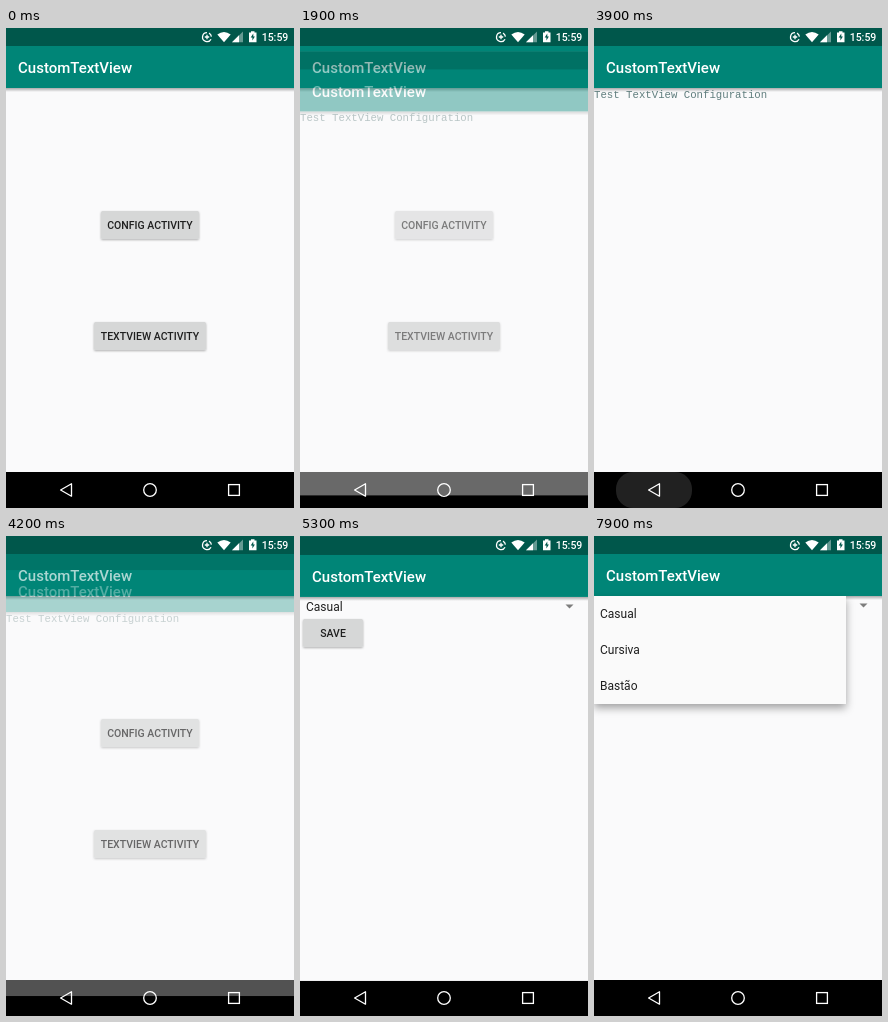
Animation of 288x480 px, one loop 8 s. Source, as an HTML page:

```html
<!DOCTYPE html>
<html lang="en">
<head>
<meta charset="utf-8">
<style>
  html, body { margin: 0; width: 100%; height: 100%; overflow: hidden; background: #000; }
  svg { display: block; width: 288px; height: 480px; }
  text { font-family: Roboto, sans-serif; white-space: pre; }
  .title { font-size: 15px; font-weight: 500; fill: #fff; }
  .label { font-size: 10.5px; font-weight: 500; fill: #1f1f1f; text-anchor: middle; }
  .item { font-size: 12px; fill: #1f1f1f; }
  .mono { font: 10.7px "Liberation Mono", monospace; fill: #5f7d7d; }
  .key { fill: #d6d7d7; filter: url(#lift); }
  .line { fill: none; stroke: #fff; stroke-width: 1.3; }
</style>
</head>
<body>
<svg viewBox="0 0 288 480">
  <defs>
    <linearGradient id="fade" x2="0" y2="1">
      <stop stop-opacity=".32"/><stop offset="1" stop-opacity="0"/>
    </linearGradient>
    <filter id="lift" x="-10%" y="-30%" width="120%" height="170%">
      <feDropShadow dx="0" dy="1" stdDeviation=".8" flood-opacity=".3"/>
    </filter>
    <filter id="float" x="-10%" y="-20%" width="120%" height="150%">
      <feDropShadow dx="0" dy="4" stdDeviation="4" flood-opacity=".36"/>
    </filter>
    <clipPath id="reveal"><rect id="revealBox" y="60" width="252" height="108"/></clipPath>
    <clipPath id="configClip"><rect x="95" y="183" width="98" height="28" rx="1.5"/></clipPath>
    <clipPath id="textClip"><rect x="88" y="294" width="112" height="28" rx="1.5"/></clipPath>
    <g id="frame">
      <rect width="288" height="480" fill="#fafafb"/>
      <rect y="60" width="288" height="4" fill="url(#fade)"/>
      <rect width="288" height="60" fill="#008577"/>
      <rect width="288" height="18" fill="#00574b"/>
      <rect y="444" width="288" height="60"/>
      <text class="title" x="12" y="45.2">CustomTextView</text>
    </g>
  </defs>

  <g id="home">
    <use href="#frame"/>
    <rect class="key" x="95" y="183" width="98" height="28" rx="1.5"/>
    <g clip-path="url(#configClip)"><circle id="configRipple" cx="144" cy="197"/></g>
    <text class="label" x="144" y="200.8">CONFIG ACTIVITY</text>
    <rect class="key" x="88" y="294" width="112" height="28" rx="1.5"/>
    <g clip-path="url(#textClip)"><circle id="textRipple" cx="144" cy="308"/></g>
    <text class="label" x="144" y="311.8">TEXTVIEW ACTIVITY</text>
  </g>

  <g id="textPage">
    <use href="#frame"/>
    <text class="mono" x="0" y="69.5">Test TextView Configuration</text>
  </g>

  <g id="configPage">
    <use href="#frame"/>
    <text class="item" x="6" y="74">Casual</text>
    <path d="M265.5 67.5h8l-4 4z" fill="#7d7d7d"/>
    <rect class="key" x="3" y="82" width="60" height="28" rx="1.5"/>
    <text class="label" x="33" y="100.3">SAVE</text>
  </g>

  <g id="menu">
    <rect id="sheet" y="60" width="252" height="108" fill="#fafafa" filter="url(#float)"/>
    <g clip-path="url(#reveal)">
      <text class="item" x="6" y="82.3">Casual</text>
      <text class="item" x="6" y="118.3">Cursiva</text>
      <text class="item" x="6" y="154.3">Bastão</text>
    </g>
  </g>

  <g id="system">
    <path class="line" d="M201 4.6A4.5 4.5 0 1 0 205 11.2M203 5.1A4.5 4.5 0 0 1 205.4 8.6M201 6.8v4.4M198.8 9h4.4"/>
    <path d="M211.3 6.6Q218 1.6 224.7 6.6L218 14.2z" fill="#fff"/>
    <path d="M226 14.2L237 3.4V14.2z" fill="#fff" opacity=".4"/>
    <path d="M226 14.2L233 7.3V14.2z" fill="#fff"/>
    <path d="M243 4.4h2V3.2h3.5v1.2h2V14.2h-7.5z" fill="#fff"/>
    <path d="M247.3 5.6l-2.6 4h1.7v3l2.5-4.1h-1.6z" fill="#00574b"/>
    <text x="255.7" y="12.9" font-size="10.5" font-weight="500" fill="#fff">15:59</text>
    <rect id="backRipple" x="22" y="444" width="76" height="36" rx="17" fill="#fff"/>
    <path class="line" d="M54.6 462L65.5 455.8V468.2z" stroke-linejoin="round"/>
    <circle class="line" cx="144" cy="462" r="6.3"/>
    <rect class="line" x="222.6" y="456.6" width="10.8" height="10.8"/>
  </g>
</svg>
<script>
  const LOOP = 8000, SLIDE = 38.4;
  const $ = id => document.getElementById(id);
  const span = (t, start, length) => Math.min(1, Math.max(0, (t - start) / length));
  const easeOut = (x, power) => 1 - (1 - x) ** power;

  function place(id, y, alpha) {
    const el = $(id);
    el.style.display = alpha > 0 ? "" : "none";
    el.setAttribute("transform", `translate(0 ${y})`);
    el.setAttribute("opacity", alpha);
  }

  function openPage(id, t, start) {
    place(id, SLIDE * (1 - span(t, start, 350)) ** 5, easeOut(span(t, start, 200), 3));
  }

  function press(id, t, start, end) {
    const grow = easeOut(span(t, start, 260), 2);
    $(id).setAttribute("r", 62 * grow);
    $(id).setAttribute("opacity", .07 * span(t, start, 100) * (1 - span(t, end, 300)));
  }

  function render(t) {
    press("textRipple", t, 1480, 1850);
    press("configRipple", t, 4780, 5150);

    if (t < 4000) openPage("textPage", t, 1868);
    else place("textPage", SLIDE * span(t, 4000, 250) ** 4, 1 - span(t, 4100, 150));
    openPage("configPage", t, 5118);

    const back = easeOut(span(t, 3750, 150), 3);
    $("backRipple").setAttribute("x", 60 - 38 * back);
    $("backRipple").setAttribute("width", 76 * back);
    $("backRipple").setAttribute("opacity", .13 * back * (1 - span(t, 3920, 200)));

    const drop = easeOut(span(t, 6200, 250), 3);
    const height = 20 + 88 * drop;
    $("sheet").setAttribute("height", height);
    $("revealBox").setAttribute("height", height);
    place("menu", 0, span(t, 6200, 120));
  }

  const origin = performance.now();
  function tick() {
    render((performance.now() - origin) % LOOP);
    requestAnimationFrame(tick);
  }
  tick();
</script>
</body>
</html>
```
